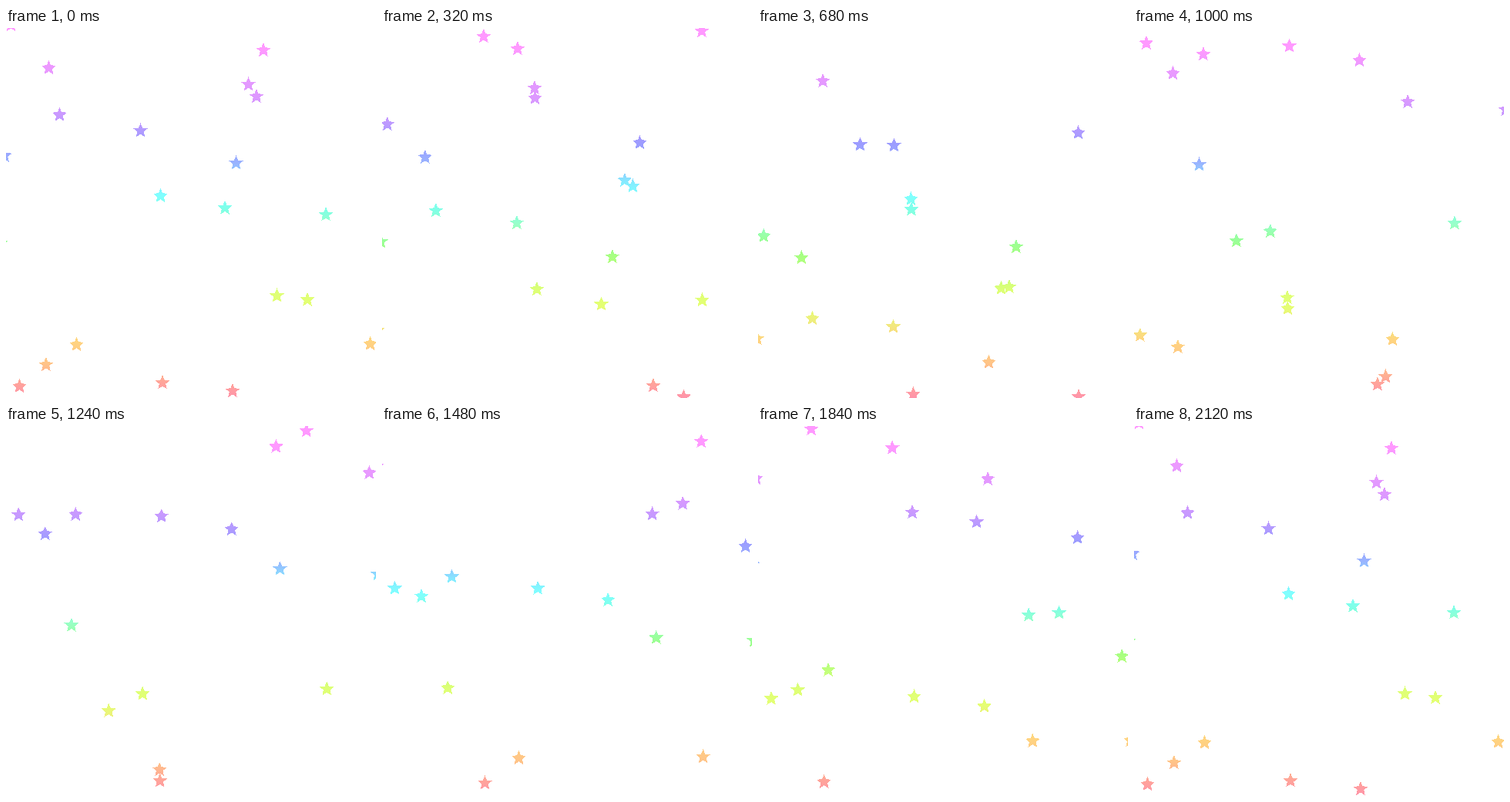
Write an HTML page that moves like this. It is 480 px wide and 480 px high and loops after 2.16 s.

```html
<!DOCTYPE html>
<html lang="en">
<head>
<meta charset="utf-8">
<title>Falling rainbow stars</title>
<style>
  html, body { margin: 0; width: 100%; height: 100%; overflow: hidden; background: #fff; }
  svg { display: block; width: 100%; height: 100%; }
</style>
</head>
<body>
<svg viewBox="0 0 480 480">
  <defs>
    <linearGradient id="rainbow" gradientUnits="userSpaceOnUse" x1="0" y1="0" x2="0" y2="480"></linearGradient>
  </defs>
  <path id="stars" fill="url(#rainbow)" shape-rendering="crispEdges"/>
</svg>
<script>
const STEP = 40, FRAMES = 54, CYCLE = FRAMES - 1, DRIFT = 0.055;
const OUTER = 10, INNER = 4.5;

// Height in the stage and the colour seen there.
const stops = [
  [28, '#ff99ff'], [50, '#ec99ff'], [90, '#dd99ff'], [120, '#c29aff'], [150, '#9c9cff'],
  [175, '#99b3ff'], [200, '#85ebff'], [217, '#80ffff'], [236, '#80ffe6'], [255, '#99ffc8'],
  [275, '#99ff99'], [297, '#a8ff80'], [340, '#ddff77'], [360, '#e4ff73'], [380, '#eeee7d'],
  [405, '#ffd480'], [435, '#ffc488'], [460, '#ffa49a'], [480, '#ff94aa']
];

// x and y at the start of the loop, fall per step.
const stars = [
  [6.5, -4.8, 16.1], [55.5, 51, 14.48], [69.5, 111.8, 15.54], [334, 28, 15],
  [314.5, 72.3, 15.56], [325, 88, 14.53], [174.5, 132.3, 14.96], [298.5, 174.3, 15.21],
  [200.5, 217, 15.13], [284, 232.7, 15.6], [415, 241.2, 13.88], [351.5, 346.5, 14.58],
  [391, 351.7, 15.75], [472.5, 409, 15.87], [91.5, 410, 13.46], [52, 436, 13.5],
  [17.5, 464, 15.9], [203, 459.3, 15.6], [294, 470, 15.32], [353.7, -277.6, 14.9],
  [480.7, -254.5, 14.38], [83.2, -162.4, 13.55], [131.5, -114.6, 15.59], [175.5, -85.4, 13.93],
  [197.5, -51, 16], [198, -38.5, 16.06], [414.5, -114.2, 14.66], [-2, 164.8, 13.96],
  [-6.5, 278, 14.17]
];

const points = Array.from({ length: 10 }, (_, i) => {
  const radius = i % 2 ? INNER : OUTER, angle = Math.PI * (i / 5 - 0.5);
  return [radius * Math.cos(angle), radius * Math.sin(angle) + 0.95];
});

const starPath = (x, y) =>
  'M' + points.map(([dx, dy]) => `${(x + dx).toFixed(2)} ${(y + dy).toFixed(2)}`).join('L') + 'Z';

document.getElementById('rainbow').innerHTML = stops
  .map(([y, color]) => `<stop offset="${y / 480}" stop-color="${color}"/>`).join('');
const shape = document.getElementById('stars');

function draw(time) {
  const step = Math.floor(time / STEP) % FRAMES;
  let path = '';
  for (const [x, y, speed] of stars) {
    // Each star also shows the rest of its fall from the cycle before.
    for (const age of [step, step - CYCLE]) {
      const top = y + speed * age;
      if (top > -12 && top < 492) path += starPath(x + DRIFT * age, top);
    }
  }
  shape.setAttribute('d', path);
}

const start = performance.now();
function tick() {
  draw(performance.now() - start);
  requestAnimationFrame(tick);
}
tick();
</script>
</body>
</html>
```
